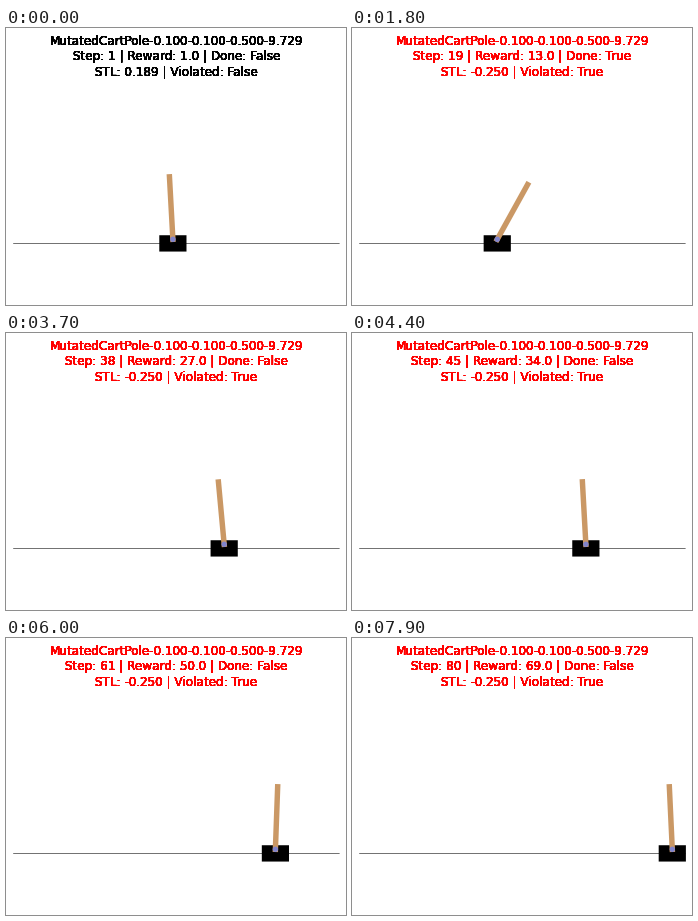
Animation, 340 px wide and 277 px high, one loop 8000 ms. Source, as a matplotlib script:

```python
import numpy as np
import matplotlib.pyplot as plt
from matplotlib.animation import FuncAnimation
from matplotlib.patches import Circle, Polygon, Rectangle

W, H, DPI = 340, 277, 64
STEPS, INTERVAL = 80, 100
PX = 72 / DPI                        # points per pixel
LEFT, TOP, SCALE = 7.2, 52.2, 0.544  # 600 x 400 scene inside the stage
CART_W, CART_H = 50 * SCALE, 30 * SCALE
TRACK_Y = TOP + 300 * SCALE
AXLE_Y = TRACK_Y - 7.5 * SCALE
FALL_ANGLE = np.radians(12)


def ease(points, t):
    """Smoothstep from one (time, value) point to the next."""
    k, v = np.array(points).T
    i = np.clip(np.searchsorted(k, t, side="right") - 1, 0, len(k) - 2)
    s = (t - k[i]) / (k[i + 1] - k[i])
    return v[i] + (v[i + 1] - v[i]) * s * s * (3 - 2 * s)


t = np.arange(STEPS)
# One big fall and recovery on top of a gentle balancing wobble.
fall = 0.485 * np.exp(-((t - 17.1) / 4.3) ** 2 / 2)
wobble = ease([(0, -.055), (28, .067), (37, -.092), (50, -.026),
               (70, .098), (79, -.047)], t)
theta = fall + wobble
# The fall sets the pole drifting steadily; the cart swings around that path.
drift = 164.4 + 2.48 * 2 * np.log1p(np.exp((t - 17) / 2))
cart_x = drift - SCALE * 125 * 2 / 3 * np.arcsinh(np.tan(theta))

done = np.abs(theta) > FALL_ANGLE
reward = np.cumsum(~done) + (np.cumsum(done) > 0)
stl = np.minimum.accumulate(np.maximum(0.244 - np.abs(theta), -0.25))

fig = plt.figure(figsize=(W / DPI, H / DPI), dpi=DPI, facecolor="white")
ax = fig.add_axes([0, 0, 1, 1])
ax.set(xlim=(0, W), ylim=(H, 0))
ax.axis("off")

scene = Rectangle((LEFT, TOP), 600 * SCALE, 400 * SCALE, fc="white", ec="none")
track = Rectangle((LEFT, TRACK_Y), 600 * SCALE, SCALE, fc="black", ec="none")
cart = Rectangle((0, TRACK_Y - CART_H / 2), CART_W, CART_H, fc="black", ec="none")
pole = Polygon(np.zeros((4, 2)), fc="#ca9865", ec="none")
axle = Circle((0, AXLE_Y), 5 * SCALE, fc="#8184cb", ec="none")
ax.add_patch(scene)
for part in (track, cart, pole, axle):
    ax.add_patch(part)
    part.set_snap(False)
    part.set_clip_path(scene)


def stacked_text(y):
    # Repeated drawing hardens the glyph edges.
    return [ax.text(170.4, y, "", ha="center", va="baseline", fontsize=12 * PX,
                    family="DejaVu Sans") for _ in range(16)]


lines = [stacked_text(y) for y in (17, 32, 47)]


def draw(i):
    x, a = cart_x[i], theta[i]
    cart.set_x(x - CART_W / 2)
    axle.center = (x, AXLE_Y)
    up = np.array([np.sin(a), -np.cos(a)]) * SCALE
    side = np.array([np.cos(a), np.sin(a)]) * SCALE
    pole.set_xy([np.array([x, AXLE_Y]) + r * up + s * side
                 for r, s in ((-5, -5), (120, -5), (120, 5), (-5, 5))])

    violated = bool(stl[i] < 0)
    words = ("MutatedCartPole-0.100-0.100-0.500-9.729",
             f"Step: {i + 1} | Reward: {reward[i]:.1f} | Done: {bool(done[i])}",
             f"STL: {stl[i]:.3f} | Violated: {violated}")
    for copies, text in zip(lines, words):
        for label in copies:
            label.set_text(text)
            label.set_color("red" if violated else "black")
    return [cart, pole, axle, *sum(lines, [])]


anim = FuncAnimation(fig, draw, frames=STEPS, interval=INTERVAL,
                     repeat=True, repeat_delay=0, blit=False)
plt.show()
```
